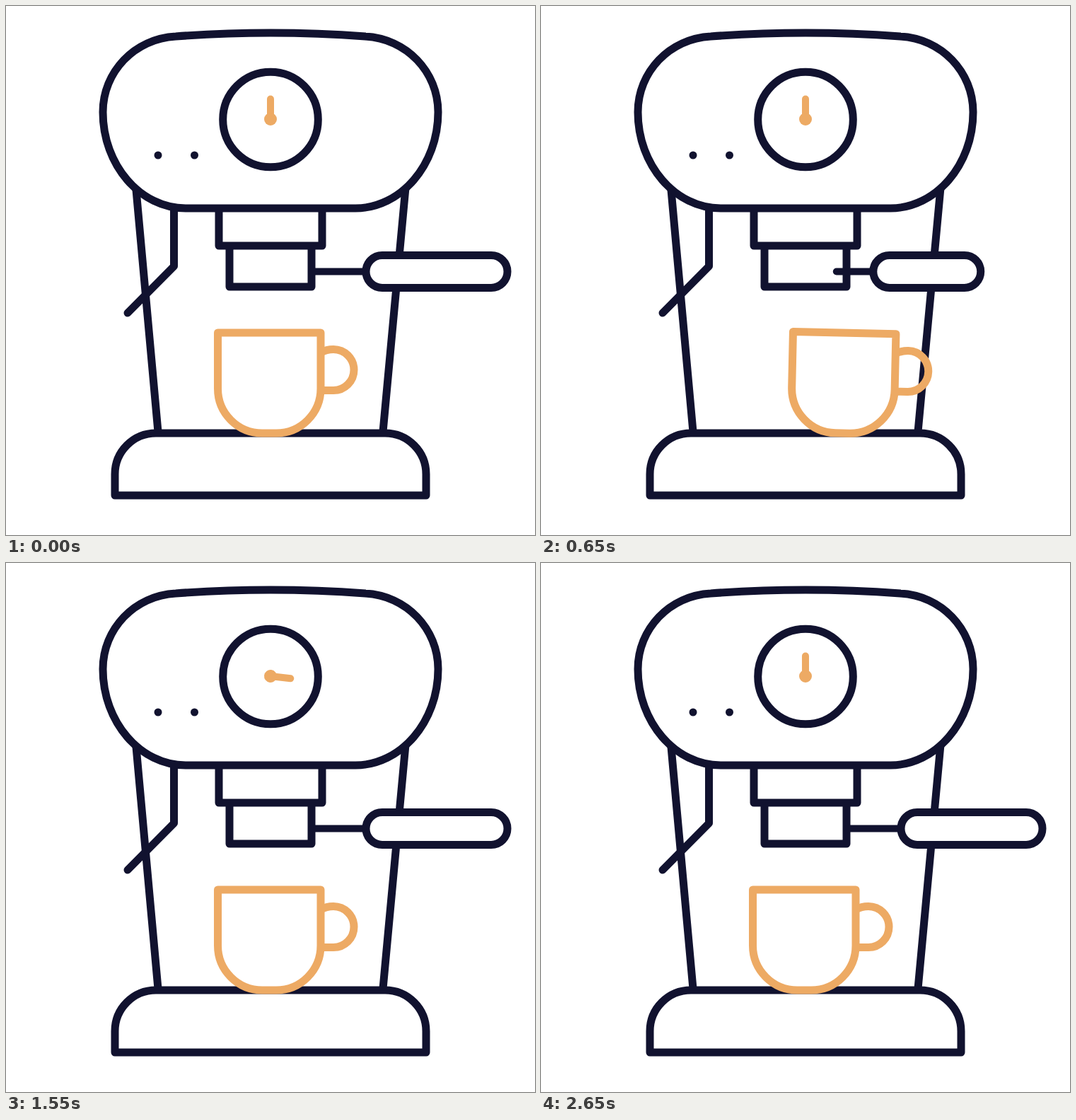
An HTML page that plays this animation: 748x748 px, repeating every 2.67 s.

```html
<!DOCTYPE html>
<html lang="en">
<head>
<meta charset="utf-8">
<title>Espresso machine</title>
<style>
  html, body { margin: 0; width: 100%; height: 100%; overflow: hidden; background: #fff; }
  svg { display: block; width: 100vw; height: 100vh; }
  .line { fill: none; stroke: #11122f; stroke-width: 11; stroke-linecap: round; stroke-linejoin: round; }
  .solid { fill: #fff; }
  .accent { stroke: #edaa64; }
</style>
</head>
<body>
<svg viewBox="0 0 748 748">
  <g class="line">
    <path d="M184 260L215 602M565 257L533 602"/>
    <path class="solid" d="M154 692V662A58 58 0 0 1 212 604H536A58 58 0 0 1 594 662V692Z"/>
    <path d="M237.500 286V368L172 434"/>
    <path id="stream"/>
    <path class="solid" d="M301 286V339H447V286M316 339V397H432V339"/>
    <path class="solid" d="M240 43Q374 33 508 43C566 46 611 93 611 150C611 225 558 286 494 286H254C190 286 137 225 137 150C137 93 182 46 240 43Z"/>
    <circle cx="374" cy="160.500" r="67.300"/>
    <path id="rod" stroke-width="10"/>
    <rect id="grip" class="solid" y="352.500" height="46" rx="23"/>
    <g id="cup" class="accent">
      <path d="M445 490Q453 485.500 463 485.500A29 29 0 0 1 463 543.500H445"/>
      <path class="solid" d="M299.500 462H445V541A63 63 0 0 1 382 604H362.500A63 63 0 0 1 299.500 541Z"/>
    </g>
  </g>
  <g fill="#11122f">
    <circle cx="215" cy="211" r="5.500"/>
    <circle cx="266.500" cy="211" r="5.500"/>
  </g>
  <g id="needle">
    <path class="line accent" style="stroke-width:10" d="M374 160V131.500"/>
    <circle cx="374" cy="160" r="9" fill="#edaa64"/>
  </g>
</svg>
<script>
  const LOOP = 2670;
  const byId = id => document.getElementById(id);
  const [stream, rod, grip, cup, needle] = ['stream', 'rod', 'grip', 'cup', 'needle'].map(byId);

  const progress = (t, start, end) => Math.min(1, Math.max(0, (t - start) / (end - start)));
  const mix = (a, b, u) => a + (b - a) * u;
  const swing = u => (1 - Math.cos(Math.PI * u)) / 2;

  // Bezier easing with flat ends: control points (x1, 0) and (x2, 1).
  function bezier(u, x1, x2) {
    let low = 0, high = 1, s;
    for (let i = 0; i < 24; i++) {
      s = (low + high) / 2;
      const x = 3 * (1 - s) ** 2 * s * x1 + 3 * (1 - s) * s * s * x2 + s ** 3;
      if (x < u) low = s; else high = s;
    }
    return s * s * (3 - 2 * s);
  }

  function moveHandle(t) {
    const k = t < 430
      ? mix(1, -0.03, bezier(progress(t, 0, 430), 0.33, 0.37))
      : mix(-0.03, 1, bezier(progress(t, 430, 1200), 0.2, 0));
    const start = mix(389, 432.700, k), left = mix(394, 509, k), right = mix(453, 709, k);
    rod.setAttribute('d', `M${start} 375.500H${left}`);
    grip.setAttribute('x', left);
    grip.setAttribute('width', right - left);
  }

  function moveCup(t) {
    let shift, lean;
    if (t < 420) {
      const u = t / 420;
      shift = -640 * u ** 3;
      lean = 21 * u ** 2.35;
    } else {
      shift = 590 * (1 - progress(t, 420, 840)) ** 3;
      lean = t < 720
        ? mix(21, -2, swing(progress(t, 440, 720)))
        : mix(-2, 0, swing(progress(t, 720, 1000)));
    }
    cup.setAttribute('transform', `translate(${shift}) rotate(${lean} 372.500 604)`);
  }

  function turnNeedle(t) {
    const turn = swing(progress(t, 750, 1640)) - swing(progress(t, 1680, 2660));
    needle.setAttribute('transform', `rotate(${-270 * turn} 374 160)`);
  }

  function pour(t) {
    const start = t < 1600 ? 770 : 1980;
    const fall = delay => mix(397, 604, swing(progress(t, start + delay, start + delay + 240)));
    const head = fall(0), tail = fall(260);
    stream.setAttribute('d', head > tail ? `M374 ${tail}V${head}` : '');
  }

  function draw() {
    const t = performance.now() % LOOP;
    moveHandle(t);
    moveCup(t);
    turnNeedle(t);
    pour(t);
    requestAnimationFrame(draw);
  }
  draw();
</script>
</body>
</html>
```
